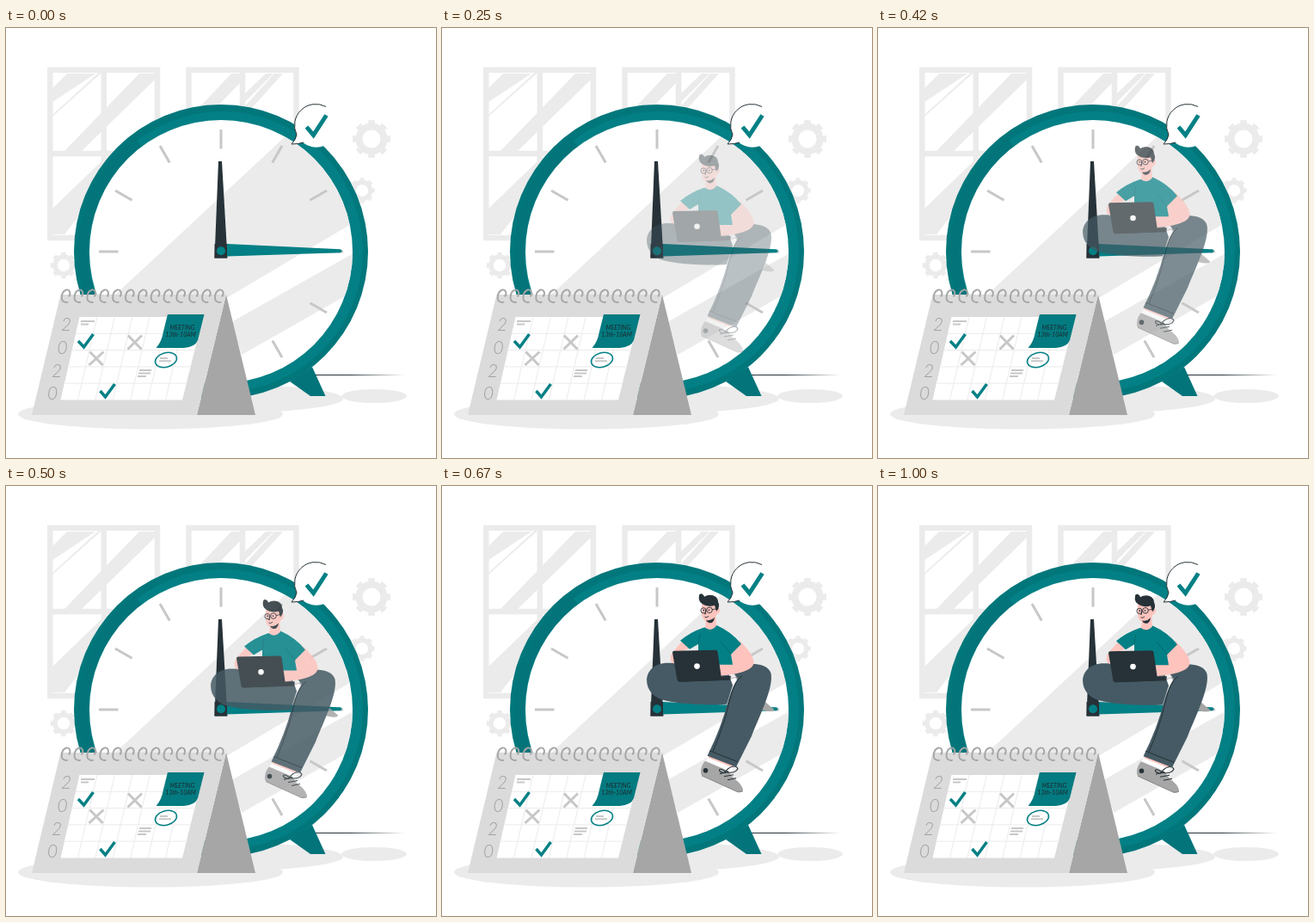
Animation of 500x500 px, one loop 1.04 s. Source, as an HTML page:

```html
<!DOCTYPE html>
<html lang="en">
<head>
<meta charset="utf-8">
<title>Time planning</title>
<style>
  html, body { margin: 0; width: 100%; height: 100%; overflow: hidden; background: #fff; }
  svg { display: block; width: 100%; height: 100%; }
  .pale { fill: #ebebeb; }
  .line { fill: none; stroke-linejoin: miter; }
  .teal { fill: #038085; }
  .ink { fill: #263238; }
  .skin { fill: #ffc3bd; }
  .pants { fill: #455a64; }
  .shoe { fill: #a6a6a6; }
  .year { font: 300 italic 21px Lato, sans-serif; fill: #a0a0a0; text-anchor: middle; }
  .note { font: italic 7px Lato, sans-serif; fill: #1b2b31; text-anchor: middle; }
</style>
</head>
<body>
<svg viewBox="0 0 500 500">
  <defs>
    <linearGradient id="fade">
      <stop offset="0" stop-color="#263238" stop-opacity="0"/>
      <stop offset=".15" stop-color="#263238"/>
      <stop offset=".85" stop-color="#263238"/>
      <stop offset="1" stop-color="#263238" stop-opacity="0"/>
    </linearGradient>
    <clipPath id="face"><circle cx="250" cy="260" r="153"/></clipPath>
    <g id="gear" class="line" stroke="#ebebeb">
      <circle r="14.5" stroke-width="8"/>
      <circle r="19.5" stroke-width="5" pathLength="16" stroke-dasharray="1" stroke-dashoffset=".5"/>
    </g>
  </defs>

  <!-- windows and gears -->
  <g class="line" stroke="#ebebeb" stroke-width="6.5">
    <path d="M51.3 48.8H176V244H51.3ZM113.8 49V244M51 146H176"/>
    <path d="M212.5 244V48.8H337.5V244M275 49V244M212 146H338"/>
  </g>
  <g class="pale">
    <path d="M54 70L71 53H104L54 86ZM111 49L54 101V103L111 52Z"/>
    <path d="M155 53H173V60L88 143H68Z"/>
    <path d="M54 210L111 155V185L68 240H54Z"/>
    <path d="M262 53H272V64L246 91H226ZM312 53H322L284 95H274Z"/>
    <path d="M302 53H311L277 87V77Z"/>
  </g>
  <use href="#gear" x="425" y="129"/>
  <use href="#gear" transform="translate(414 189) scale(.67)"/>
  <use href="#gear" transform="translate(67 276) scale(.69)"/>

  <!-- floor -->
  <rect x="38" y="403" width="425" height="1" fill="url(#fade)"/>
  <ellipse class="pale" cx="243" cy="431" rx="149" ry="17"/>
  <ellipse class="pale" cx="428" cy="428" rx="38" ry="8"/>
  <ellipse class="pale" cx="168" cy="449" rx="154" ry="17.5"/>

  <!-- clock -->
  <path d="M330 411L356 394L371.500 428H354Z" fill="#02747a"/>
  <circle cx="250" cy="260" r="171" fill="#02777b"/>
  <circle cx="252" cy="260" r="163" class="teal"/>
  <path d="M112 352A166 166 0 0 1 150 128L158 138A153 153 0 0 0 121 345Z" fill="#02747a"/>
  <circle cx="250" cy="260" r="153" fill="#fff"/>
  <g class="pale" clip-path="url(#face)">
    <path d="M342 110L110 326H236L420 217V110Z"/>
    <path d="M420 253L262 342L274 380L420 297Z"/>
  </g>
  <g id="ticks" stroke="#c7c7c7" stroke-width="3"></g>
  <path class="ink" d="M247 155H251L257.500 267.500H242.500Z"/>
  <path class="teal" d="M257 251L389 257.300Q392 259.300 389 261.300L257 265.500Z"/>
  <rect class="ink" x="242.500" y="251" width="14.500" height="16.500"/>
  <circle class="teal" cx="250" cy="259.300" r="5"/>

  <!-- speech bubble -->
  <circle cx="361" cy="114" r="24.700" fill="#fff"/>
  <path d="M372 91.500A24.700 24.700 0 0 0 338 124Q337 130 332 135Q340 135 346 133" fill="#fff" stroke="#263238"/>
  <path class="line" d="M349.500 115L357.500 124.500L372.500 101.500" stroke="#038085" stroke-width="5"/>

  <!-- seated man -->
  <g id="man" opacity="0">
    <path class="shoe" d="M331 226L344 221L365 242L386 260Q386 263 378 262L359 258Z"/>
    <path d="M333 226L341 223L351 237L344 242Z" fill="#fff"/>
    <path class="pants" d="M264 206C230 205 230 245 261 250C285 255 315 255 331 254L338 232L332 215L330 207Z"/>
    <path class="skin" d="M312 311L341 322L336 332L307 323Z"/>
    <path d="M309 316L339 328L336 333L305 322Z" fill="#fff"/>
    <path class="shoe" d="M306 320C301 325 300 333 302 337L343 356Q350 358 350 353Q348 346 339 340L332 331Z"/>
    <circle class="ink" cx="306.500" cy="331" r="2.800"/>
    <path class="line" d="M302 337L344 356L350 355" stroke="#8a8a8a"/>
    <path class="line" d="M323 335L333 332M328 338L339 336M332 342L342 340M329 333C334 326 342 324 344 329Q341 335 330 333C325 328 321 329 323 332Q327 335 331 333" stroke="#263238" stroke-width="1.100"/>
    <path class="pants" d="M334 212C354 204 379 205 382.500 218C386 235 368 270 360 291L342 327L308.500 314Q325 281 333 249Q338 233 344 224Z"/>
    <path class="line" d="M311 308L344 321M349 221C336 230 334 256 328 274Q322 293 315 309" stroke="#263238"/>
    <path class="skin" d="M280 180L267 195C264 202 266 207 272 207L274 195L290 188Z"/>
    <path class="skin" d="M346 180C354 189 363 197 362.500 206C361 216 342 219 324 221L321 206L338 201L331 192Z"/>
    <path class="teal" d="M304 165Q289 170 277 180L288 190L298 184V208H338L336 196L348 184Q337 170 319 162Z"/>
    <path class="line" d="M298 184L300 172M336 196L324 181" stroke="#02666a" stroke-width=".8"/>
    <path class="skin" d="M307 153L318 150L319 163Q313 170 306 165Z"/>
    <path class="skin" d="M302 136H319L320 142Q325 142 322 148L319 150Q318 160 311 159Q302 157 302 149Z"/>
    <path class="ink" d="M299 128C299 124 304 125 305 129C311 125 321 127 321 135Q324 141 319 146L317 139Q307 142 300 135Q298 131 299 128Z"/>
    <path class="ink" d="M307 156Q312 158 317 153Q316 160 311 159.500Q308 159 307 156Z"/>
    <g class="line" stroke="#263238" stroke-width=".9">
      <circle cx="304" cy="145" r="3.100"/>
      <circle cx="311" cy="144.500" r="3.300"/>
      <path d="M314 144L321 142.500M306.500 144V149L305 149M305.500 152.500Q308 154 310 151.500"/>
    </g>
    <circle class="ink" cx="304.300" cy="144.700" r=".9"/>
    <circle class="ink" cx="310.500" cy="144.500" r=".9"/>
    <path class="ink" d="M290 224L336 221L335 226L275 228Z"/>
    <path class="ink" d="M270 192L318 191Q320 191 320.500 193L325 224Q325 226 323 226.300L276 228Q274 228 273.500 226L268 194Q268 192 270 192Z"/>
    <circle cx="296.500" cy="209.800" r="3.300" fill="#fff"/>
  </g>

  <!-- desk calendar -->
  <path d="M256 310L290 450H222Z" fill="#a6a6a6"/>
  <path d="M63.500 310H256L222 450H30Z" fill="#dbdbdb"/>
  <path d="M85.500 336H229L205 432.500H63.500Z" fill="#fff"/>
  <path id="grid" class="line" stroke="#ebebeb"/>
  <path id="rings" class="line" stroke="#a6a6a6" stroke-width="1.900"/>
  <text class="year" x="70" y="352">2</text>
  <text class="year" x="65.500" y="378.500">0</text>
  <text class="year" x="59" y="405.500">2</text>
  <text class="year" x="54" y="432">0</text>
  <path d="M188 333H230.500L223 363Q220 371 207 372H174.500Q181 365 183 353Z" fill="#037b80"/>
  <text class="note" x="205" y="350.500">MEETING</text>
  <text class="note" x="203" y="359.300">13th-10AM</text>
  <g class="line" stroke="#038085">
    <path d="M84 364L90.500 371L101.500 356M109.500 422L115.500 429L126.500 414" stroke-width="3.500"/>
    <ellipse cx="186" cy="386" rx="12.800" ry="8.300" transform="rotate(-15 186 386)" stroke-width="1.500"/>
  </g>
  <g class="line" stroke="#c7c7c7">
    <path d="M142 357.500L157.500 373.500M158 357.500L141.500 373.500M97.500 376.500L112.500 392M113.500 376.500L96.500 392" stroke-width="3"/>
    <path d="M87 341H103M87 344.500H96M155 398H169M154 401.500H168M153 405H163M179 384H188M178 387.300H192" stroke-width="1.900"/>
  </g>
</svg>
<script>
  const LOOP = 1040, ENTER = 60, SETTLED = 580;
  const byId = id => document.getElementById(id);
  const range = (n, f) => Array.from({ length: n }, (_, i) => f(i)).join("");

  byId("ticks").innerHTML = range(12, i =>
    `<path d="M250 118V140.500" transform="rotate(${i * 30} 250 260)"/>`);

  byId("grid").setAttribute("d",
    range(4, i => { const y = 355.3 + i * 19.3, x = 85.5 - (y - 336) * .228; return `M${x} ${y}h142.500`; }) +
    range(6, i => `M${106 + i * 20.4} 336l-22.500 96.500`));

  byId("rings").setAttribute("d", range(13, i =>
    `M${68 + i * 14.85} 318.500c-5 -1 -4 -12 2 -14c4 -1 6 4 3 8m-5 6q2 1 4 0`));

  const man = byId("man");
  function draw(now) {
    const t = now % LOOP;
    const p = t < 80 ? 0 : Math.min(1, (t - ENTER) / (SETTLED - ENTER));
    const lift = t > SETTLED ? 4 * Math.sin(Math.PI * (t - SETTLED) / (LOOP - SETTLED + 30)) : 0;
    man.setAttribute("opacity", p);
    man.setAttribute("transform", `translate(0 ${2 + 30 * (1 - p) - lift})`);
  }

  const start = performance.now();
  (function tick() {
    draw(performance.now() - start);
    requestAnimationFrame(tick);
  })();
</script>
</body>
</html>
```
